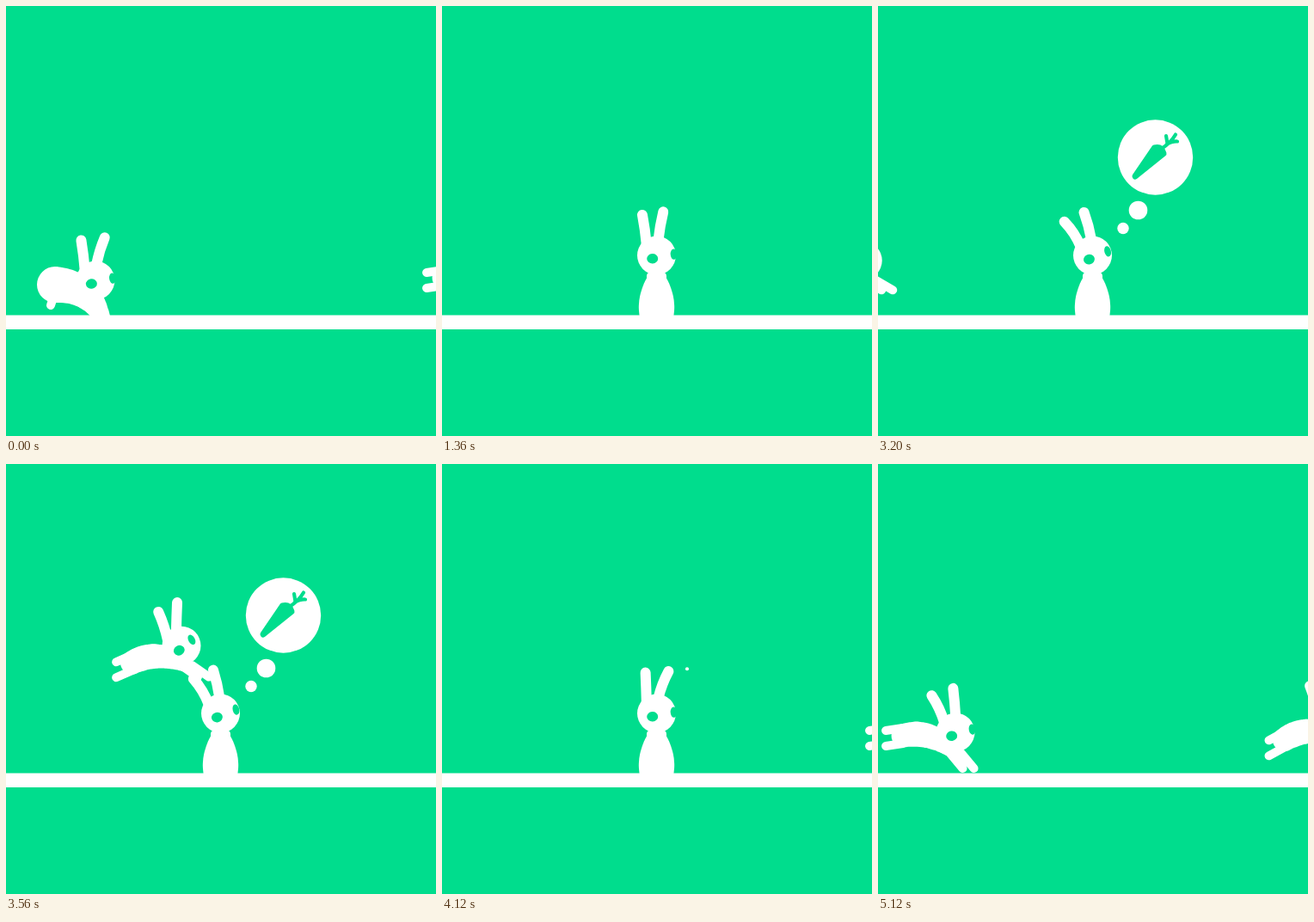
Animation, 500 px wide and 500 px high, one loop 5160 ms. Source, as an HTML page with a canvas:

```html
<!DOCTYPE html>
<html lang="en">
<head>
<meta charset="utf-8">
<title>Rabbits</title>
<style>
  html, body { margin: 0; width: 100%; height: 100%; overflow: hidden; background: #00dd8d; }
  canvas { display: block; width: 500px; height: 500px; }
</style>
</head>
<body>
<canvas id="stage"></canvas>
<script>
const LOOP = 5160, STEP = 40;
const GREEN = '#00dd8d', WHITE = '#fff';
const canvas = document.getElementById('stage');
const dpr = window.devicePixelRatio || 1;
canvas.width = canvas.height = 500 * dpr;
const ctx = canvas.getContext('2d');
ctx.scale(dpr, dpr);
ctx.lineCap = ctx.lineJoin = 'round';

const clamp = k => Math.max(0, Math.min(1, k));
const mix = (a, b, k) => a + (b - a) * k;
const rad = deg => deg * Math.PI / 180;
const turn = ([x, y], deg) => {
  const c = Math.cos(rad(deg)), s = Math.sin(rad(deg));
  return [x * c - y * s, x * s + y * c];
};
const smooth = k => k * k * (3 - 2 * k);
const rise = k => 1 - (1 - k) ** 2;
const fall = k => k * k;
const backOut = k => 1 + 2.2 * (k - 1) ** 3 + 1.2 * (k - 1) ** 2;

// Points are relative to the head; hind and fore are leg directions.
const stand = {
  tilt: -3, ears: [-8, 10],
  rump: [0, 66], back: [0, 48], chest: [0, 24], radii: [20.3, 23, 8],
  hind: [0, 0], fore: [0, 40]
};
const look = { ...stand, tilt: -14, ears: [-39, -20] };
const alert = { ...stand, tilt: -14, ears: [-33, -15] };
const calm = { ...stand, ears: [-2, 21] };
const crouch = {
  tilt: 10, ears: [6, 48],
  rump: [-17.5, 34.5], back: [-17.5, 34.5], chest: [-6, 17], radii: [26.5, 22, 8],
  hind: [0, 10], fore: [0, 30]
};
const land = {
  tilt: -6, ears: [-7, 17],
  rump: [-47, 5], back: [-12, 6], chest: [4, 36], radii: [21, 19, 11],
  hind: [-5, 15], fore: [2, 8]
};
const air = {
  tilt: -9, ears: [-25, -5],
  rump: [-61, 4], back: [-28, -4], chest: [0, 24], radii: [13.5, 17, 8],
  hind: [-20, 3], fore: [15, 18]
};

// A stretched body pitched about the head; the ears swing forward with it.
function fly(pitch) {
  const pose = { ...air, tilt: air.tilt + pitch * 1.3 };
  for (const part of ['rump', 'back', 'chest', 'hind', 'fore']) pose[part] = turn(air[part], pitch);
  pose.ears = air.ears.map(a => a + Math.abs(pitch) * 0.45);
  return pose;
}

function blend(a, b, k) {
  if (!Array.isArray(a)) return mix(a, b, k);
  return a.map((v, i) => mix(v, b[i], k));
}

const key = (t, pose, x, y, ease) => ({ t, pose, x, y, ease });
const sit = (t, pose) => key(t, pose, 249.5, 290, smooth);

// One running hop from a landing at time t to the next landing.
function hop(t, x, length = 164) {
  return [
    key(t + 80, crouch, x + length * 0.2, 319),
    key(t + 170, fly(-20), x + length * 0.66, 296),
    key(t + 210, air, x + length * 0.915, 312),
    key(t + 250, land, x + length, 319)
  ];
}

const resident = [
  ...hop(-250, -60), ...hop(0, 104, 150),
  key(400, crouch, 265, 319), key(560, crouch, 267, 315.5, smooth), key(900, crouch, 267, 315.5),
  sit(1360, stand), sit(1620, stand), sit(2000, look), sit(2340, look),
  sit(2480, alert), sit(3500, alert), sit(3840, stand), sit(4120, calm), sit(4540, calm),
  key(4700, crouch, 267, 317, smooth), ...hop(4700, 264, 156), ...hop(4950, 420)
];
const jumper = [
  ...hop(3030, -126),
  key(3370, crouch, 82, 319), key(3470, fly(-20), 150, 300),
  key(3700, fly(-8), 288, 159, rise), key(3840, fly(31), 372, 220, fall),
  key(3910, land, 428, 319), ...hop(3910, 428)
];

function dot(x, y, r) {
  ctx.moveTo(x + r, y);
  ctx.arc(x, y, r, 0, 7);
}

function disc(x, y, r) {
  ctx.fillStyle = WHITE;
  ctx.beginPath();
  dot(x, y, Math.max(0, r));
  ctx.fill();
}

function line(width, color, build) {
  ctx.lineWidth = width;
  ctx.strokeStyle = color;
  ctx.beginPath();
  build();
  ctx.stroke();
}

function legs([x, y], [dx, dy], sx, sy) {
  line(10, WHITE, () => {
    for (const side of [-1, 1]) {
      ctx.moveTo(x + sx * side, y + sy * side);
      ctx.lineTo(x + sx * side + dx, y + sy * side + dy);
    }
  });
}

function ear([x, y], angle, length) {
  const [dx, dy] = turn([0, -length], angle);
  const bend = angle * 0.003;
  line(12, WHITE, () => {
    ctx.moveTo(x, y);
    ctx.quadraticCurveTo(x + dx / 2 + dy * bend, y + dy / 2 - dx * bend, x + dx, y + dy);
  });
}

function drawRabbit(x, y, { tilt, ears, rump, back, chest, radii, hind, fore }, lid) {
  ctx.save();
  ctx.translate(x, y);
  legs(rump, hind, 0, 9);
  legs(chest, fore, 6.5, 0);
  ear(turn([-11, -13], tilt), ears[0], 35);
  ear(turn([3, -18], tilt), ears[1], 33);

  ctx.fillStyle = WHITE;
  ctx.beginPath();
  dot(0, 0, 22.5);
  const along = (a, b, c, k) => mix(mix(a, b, k), mix(b, c, k), k);
  for (let k = 0; k <= 1; k += 0.02) {
    dot(along(rump[0], back[0], chest[0], k), along(rump[1], back[1], chest[1], k), along(...radii, k));
  }
  ctx.fill();

  ctx.rotate(rad(tilt));
  ctx.fillStyle = GREEN;
  const far = 20 + Math.min(0, tilt + 8) * 0.3;
  ctx.beginPath();
  ctx.ellipse(-5, 3.5, 6.5, 5.8 * lid, 0, 0, 7);
  ctx.fill();
  ctx.beginPath();
  ctx.ellipse(far, -0.3, 3.8, 6.2 * lid, 0, 0, 7);
  ctx.fill();
  ctx.restore();
}

function rabbit(track, t, lid = 1) {
  const i = track.findIndex(k => k.t > t);
  if (i < 1) return;
  const a = track[i - 1], b = track[i];
  const k = (t - a.t) / (b.t - a.t);
  const ky = b.ease ? b.ease(k) : k;
  const kp = b.ease === smooth ? ky : k;
  const pose = {};
  for (const part in a.pose) pose[part] = blend(a.pose[part], b.pose[part], kp);
  drawRabbit(mix(a.x, b.x, kp), mix(a.y, b.y, ky), pose, lid);
}

function carrot() {
  ctx.fillStyle = GREEN;
  line(7, GREEN, () => {
    ctx.moveTo(-23.5, 22);
    ctx.lineTo(-1, -11);
    ctx.quadraticCurveTo(7, -13, 9.5, -4.5);
    ctx.closePath();
    ctx.fill();
  });
  line(4.2, GREEN, () => {
    ctx.moveTo(7, -10);
    ctx.quadraticCurveTo(18, -17, 23.5, -26.5);
    ctx.moveTo(14, -16);
    ctx.lineTo(12.5, -25);
    ctx.moveTo(13, -15);
    ctx.quadraticCurveTo(20, -19, 25.5, -18.5);
  });
}

const BURST = 3680;

function puff(t, x, y, r, start, life) {
  if (t < start) return;
  const gone = clamp((t - 3880) / life);
  disc(x, y - 29 * gone, r * backOut(clamp((t - start) / 140)) * (1 - gone));
}

function burst(k) {
  for (let i = 0; i < 11; i++) {
    const reach = (10 + i * 8) * rise(k);
    const [dx, dy] = turn([reach, 0], -20 + i * 137.5);
    disc(320 + dx, 174 + dy, (27 - i * 1.1) * (1 - k));
  }
}

function thought(t) {
  puff(t, 285, 258.5, 6.7, 1620, 345);
  puff(t, 302.5, 237.5, 10.8, 1700, 210);
  if (t >= BURST) {
    burst(clamp((t - BURST) / 320));
  } else if (t > 1780) {
    ctx.save();
    ctx.translate(322.5, 176);
    const size = Math.max(0, backOut(clamp((t - 1780) / 220)));
    ctx.scale(size, size);
    disc(0, 0, 43.7);
    carrot();
    ctx.restore();
  }
}

function draw(t) {
  ctx.fillStyle = GREEN;
  ctx.fillRect(0, 0, 500, 500);
  thought(t);
  const lid = Math.min(1, 0.1 + Math.abs(t - 2410) / 75);
  for (const shift of [-LOOP, 0, LOOP]) rabbit(resident, t + shift, lid);
  rabbit(jumper, t);
  ctx.fillStyle = WHITE;
  ctx.fillRect(0, 359.5, 500, 16.5);
  ctx.fillStyle = GREEN;
  ctx.fillRect(0, 376, 500, 124);
}

const begin = performance.now();
function frame() {
  const t = (performance.now() - begin) % LOOP;
  draw(Math.floor(t / STEP) * STEP);
  requestAnimationFrame(frame);
}
frame();
</script>
</body>
</html>
```
